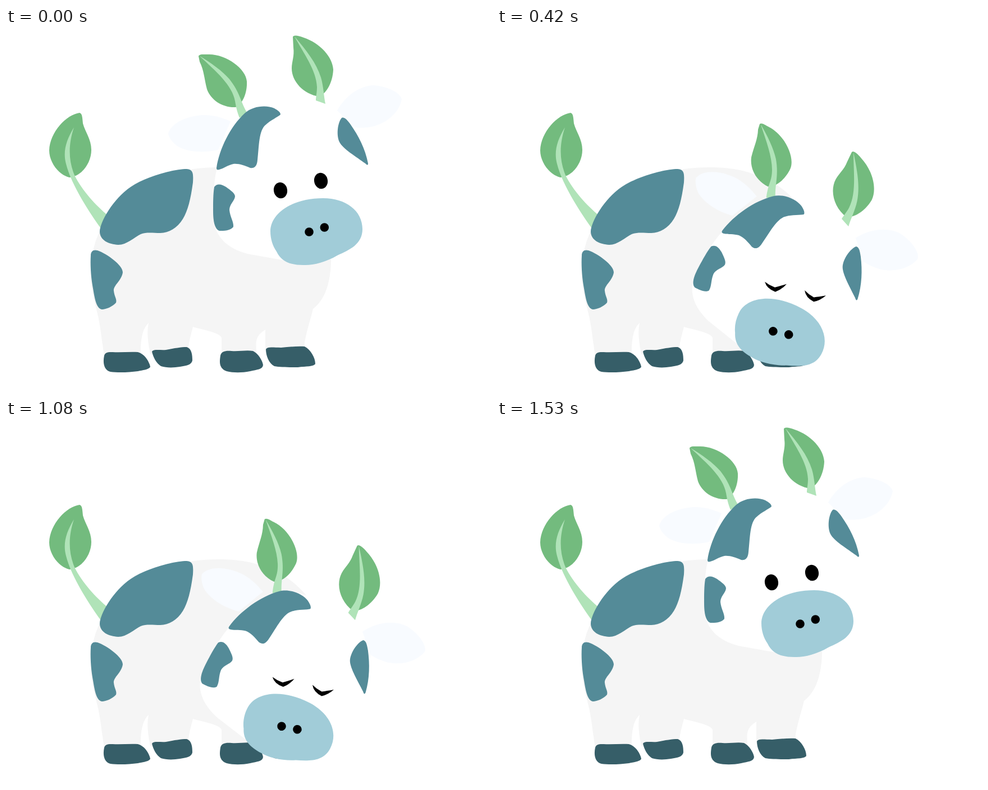
An HTML page for the animation above (2040 ms loop, 864 by 648 pixels).

```html
<!DOCTYPE html>
<html lang="en">
<head>
<meta charset="utf-8">
<title>Sleepy calf</title>
<style>
  html, body { margin: 0; width: 100%; height: 100%; overflow: hidden; background: #fff; }
  svg { display: block; width: 864px; height: 648px; }
  .coat { fill: #f5f5f5; }
  .patch { fill: #548b98; }
  .hoof { fill: #365e68; }
  .leaf { fill: #73bb7e; }
  .stem { fill: #b0e3b8; }
  .ear { fill: #f8fbff; }
  .face { fill: #fff; }
  .snout { fill: #a1ccd8; }
</style>
</head>
<body>
<svg viewBox="0 0 864 648">
  <g id="body">
    <path class="leaf" d="M131 151C136 152 136 160 137 170C141 185 152 198 152 217C152 240 135 264 113 266C95 262 77 240 77 218C78 185 108 154 131 151Z"/>
    <path class="stem" d="M121 177C107 200 101 220 107 242C115 275 145 324 170 358L182 334C160 316 136 290 122 262C112 238 110 210 121 177Z"/>
    <path class="coat" d="M168 360C158 380 152 400 151 440C153 480 163 500 168 535L175 585H240C239 555 243 535 254 525C251 540 252 555 257 580H324C325 560 329 548 333 532C350 537 384 543 384 552V580H446C446 562 441 550 462 537V575H530C533 545 541 525 547 500C568 484 578 455 579 415C570 340 520 280 462 262C430 248 380 245 333 251C250 275 190 310 168 360Z"/>
    <path class="patch" d="M167 362C168 345 190 305 222 283C250 264 300 251 322 251C333 252 334 258 333 275C329 305 324 325 315 340C305 356 290 365 275 365C262 365 250 363 240 367C228 373 215 386 200 386C183 385 167 378 167 362Z"/>
    <path class="patch" d="M151 405C151 397 156 394 163 396C180 402 208 422 208 435C206 450 191 458 192 468C193 478 198 483 196 489C190 496 178 501 171 501C160 499 158 480 154 458C151 440 150 420 151 405Z"/>
    <path class="hoof" d="M175 583C177 577 182 577 190 577C205 578 220 576 235 577C248 581 255 594 257 603C255 608 245 609 235 611C220 613 200 614 186 612C175 609 172 597 175 583Z"/>
    <path class="hoof" d="M260 576C263 571 275 574 285 573C300 570 312 568 322 568C331 571 332 582 332 592C330 600 322 601 310 603C298 605 285 605 276 602C268 597 262 586 260 576Z"/>
    <path class="hoof" d="M382 583C384 575 392 574 402 575C415 576 428 573 440 575C449 579 457 592 458 600C457 608 447 608 435 611C420 614 405 614 393 611C380 606 380 596 382 583Z"/>
    <path class="hoof" d="M463 572C466 567 475 569 490 569C505 568 518 566 532 567C543 573 551 587 551 598C548 603 535 602 520 604C505 604 488 604 478 602C468 597 463 583 463 572Z"/>
  </g>
  <g id="head">
    <path class="ear" d="M289 188C296 165 330 155 355 155C375 156 385 160 400 166L378 217C345 224 320 219 305 210C297 204 290 195 289 188Z"/>
    <path class="ear" d="M590 147C605 120 630 103 655 102C680 104 702 115 705 127C700 150 680 168 655 175C640 178 632 178 622 177Z"/>
    <path class="leaf" d="M343 50C345 46 351 47 360 47C392 46 428 73 429 95C430 115 422 135 409 141C385 142 365 128 358 109C353 90 353 76 345 60Z"/>
    <path class="stem" d="M345 50C375 78 403 102 408 130C410 142 412 150 416 160L430 152C418 132 417 115 398 91C385 76 365 62 345 50Z"/>
    <path class="face" d="M376 250C370 270 368 310 371 350C378 375 395 392 430 402L492 413L520 415L600 390C640 370 655 310 645 243C635 200 615 165 590 150C560 128 500 130 455 139C410 155 380 205 376 250Z"/>
    <path class="leaf" d="M511 16C512 12 520 13 530 17C560 27 582 52 583 74C582 98 570 117 558 122C530 118 509 95 509 72C509 60 514 50 512 35Z"/>
    <path class="stem" d="M514 15C530 45 553 75 554 105C554 115 552 122 552 129L569 135C566 122 566 105 561 88C553 62 535 40 514 15Z"/>
    <path class="patch" d="M375 249C380 215 400 175 425 152C440 138 465 137 478 143C485 147 489 150 489 154C485 158 470 165 463 172C450 182 451 210 448 235C447 247 442 250 435 249C425 245 415 241 405 242C395 244 388 250 380 252C376 253 375 252 375 249Z"/>
    <path class="patch" d="M371 283C376 276 384 278 392 283C400 289 408 294 408 300C407 308 398 314 398 324C399 336 406 345 405 354C400 361 388 361 380 361C372 358 369 345 369 325C369 310 369 295 371 283Z"/>
    <path class="patch" d="M598 160C603 158 608 164 614 172C628 192 640 215 645 241C645 245 643 244 640 241C625 230 600 215 594 203C588 190 591 168 598 160Z"/>
    <path class="snout" d="M471 362C471 330 510 303 565 303C605 303 635 325 635 358C635 385 612 395 590 405C570 417 545 423 530 422C505 422 490 415 482 398C475 388 471 375 471 362Z"/>
    <circle cx="540" cy="363" r="7.8"/>
    <circle cx="567.3" cy="355" r="7.8"/>
    <g id="open">
      <g transform="translate(489 289)">
        <ellipse rx="12" ry="14.3" transform="rotate(-10)"/>
        <g transform="rotate(-24)"><rect class="face lid" x="-18" y="-16" width="36" height="16"/></g>
      </g>
      <g transform="translate(561 272)">
        <ellipse rx="12" ry="14.3" transform="rotate(-10)"/>
        <g transform="rotate(-18)"><rect class="face lid" x="-18" y="-16" width="36" height="16"/></g>
      </g>
    </g>
    <g id="closed">
      <path id="lash" d="M485 292.7Q495 294.5 505.5 293Q512 287 521 277.6Q518 291 510 299.5Q494 302 485 292.7Z"/>
      <use href="#lash" transform="translate(70 -18) rotate(8 503 289)"/>
    </g>
  </g>
</svg>
<script>
  const LOOP = 2040, STEP = 30;
  // time, head shift x, shift y, tilt in degrees
  const KEYS = [
    [0, 0, 0, 0],
    [180, 0.5, 81.2, 18.4],
    [330, -6, 150.2, 24.3],
    [420, -4, 164, 28.5],
    [510, -3, 169.2, 31],
    [600, -3, 169.2, 28.4],
    [900, -3.3, 169, 28.8],
    [1080, -6.5, 169.5, 27.5],
    [1140, -6.5, 169.5, 27.5],
    [1200, -6, 150.2, 24.3],
    [1350, 0.5, 81.2, 18.4],
    [1530, 0, 0, 0],
    [LOOP, 0, 0, 0]
  ];
  const $ = id => document.getElementById(id);
  const lids = document.querySelectorAll('.lid');

  function poseAt(t) {
    const i = KEYS.findIndex(key => key[0] > t);
    const a = KEYS[i - 1], b = KEYS[i];
    const k = (t - a[0]) / (b[0] - a[0]);
    return a.map((v, n) => v + (b[n] - v) * k).slice(1);
  }

  function draw(t) {
    const [x, y, tilt] = poseAt(t);
    $('head').setAttribute('transform', `translate(${x} ${y}) rotate(${tilt} 492.75 282.5)`);

    const droop = Math.min(1.2, Math.max(0, (y - 110) / 40));
    const asleep = y > 157;
    $('open').setAttribute('display', asleep ? 'none' : 'inline');
    $('closed').setAttribute('display', asleep ? 'inline' : 'none');
    $('open').setAttribute('transform', `translate(${6.7 * droop} ${-2.2 * droop})`);
    lids.forEach(lid => lid.setAttribute('transform', `translate(0 ${-15 + 9.2 * droop})`));
  }

  const start = performance.now();
  function tick() {
    const t = (performance.now() - start) % LOOP;
    draw(Math.floor(t / STEP) * STEP);
    requestAnimationFrame(tick);
  }
  tick();
</script>
</body>
</html>
```
